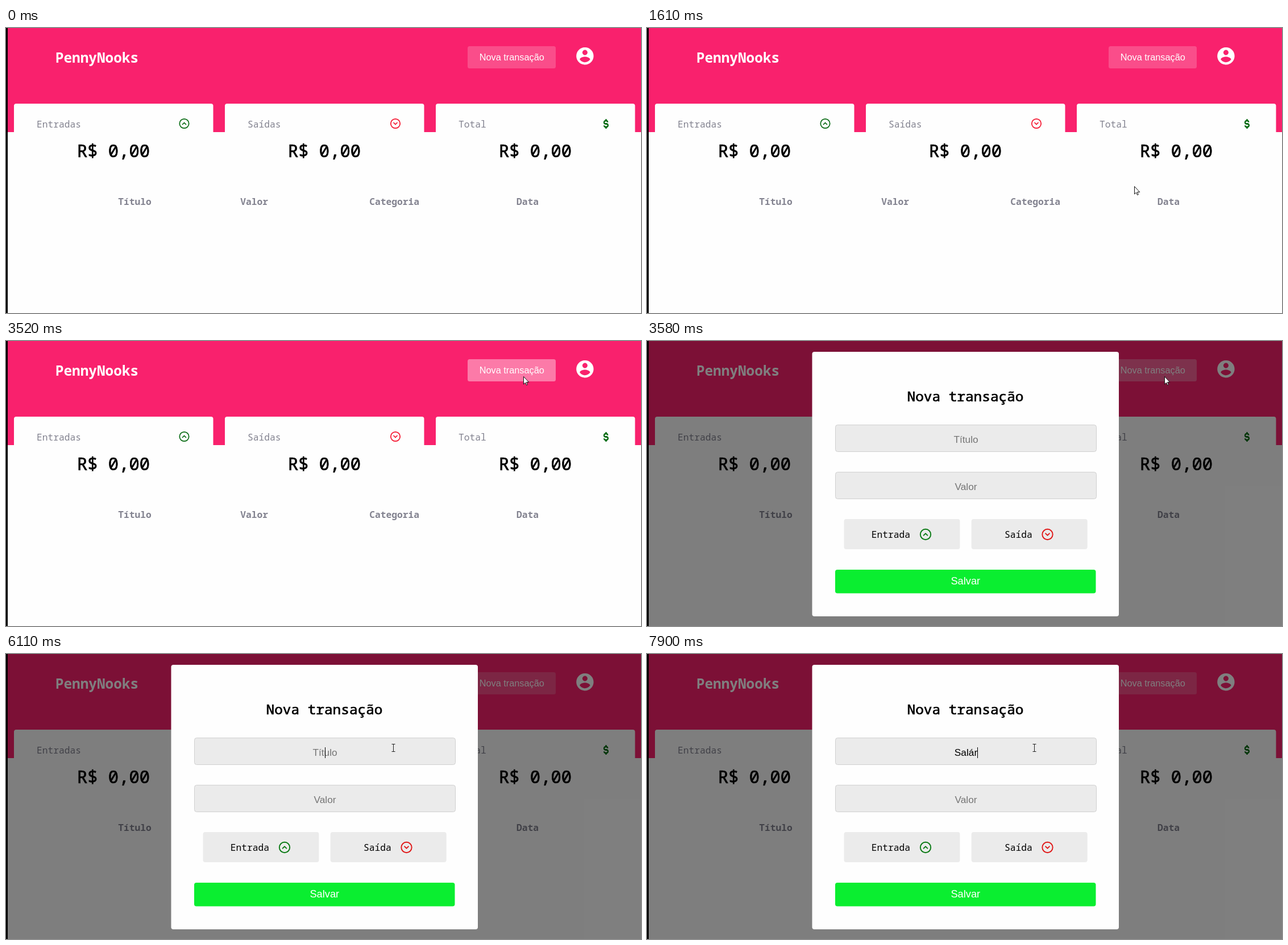
An HTML page for the animation above (8 s loop, 1117 by 501 pixels).

```html
<!DOCTYPE html>
<html lang="pt-BR">
<head>
<meta charset="utf-8">
<title>PennyNooks</title>
<style>
  html, body { margin: 0; width: 100%; height: 100%; overflow: hidden; background: #fefefe; }
  svg { display: block; width: 1117px; height: 501px; }
  text { font-family: "Noto Sans Mono", "DejaVu Sans Mono", monospace; font-size: 16.27px; white-space: pre; }
  .sans { font-family: "Liberation Sans", Arial, sans-serif; }
  .mid { text-anchor: middle; }
  .label { fill: #82828f; }
  .head { fill: #82828f; font-weight: 600; }
  .money { font-size: 30.5px; }
  .logo { font-size: 24.4px; font-weight: 700; }
  .title { font-size: 24.4px; }
  .money, .title { font-weight: 500; stroke: #000; stroke-width: .7px; }
  .field { font-size: 17.28px; }
  .save { font-size: 18.3px; fill: #fff; }
  .ring { fill: none; stroke-width: 1.7px; stroke-linecap: round; stroke-linejoin: round; }
</style>
</head>
<body>
<svg viewBox="0 0 1117 501">
  <defs>
    <g id="up" class="ring"><circle r="8.2"/><path d="M-3 1.5L0-1.5L3 1.5"/></g>
    <g id="down" class="ring"><circle r="8.2"/><path d="M-3-1.5L0 1.5L3-1.5"/></g>
  </defs>

  <rect width="1117" height="501" fill="#fefefe"/>
  <rect width="1117" height="183" fill="#f9216d"/>
  <g id="cards"></g>
  <g id="heads"></g>
  <use href="#up" x="313.5" y="168" stroke="#066a12"/>
  <use href="#down" x="685" y="168" stroke="#f5132d"/>
  <path transform="translate(1055.5 168.5) scale(1.15 1.4) translate(-12 -12)" fill="#066a12"
    d="M12 15c-1.84 0-2-.86-2-1H8c0 .92.66 2.55 3 2.92V18h2v-1.08c2-.34 3-1.63 3-2.92 0-1.12-.52-3-4-3-2 0-2-.63-2-1s.7-1 2-1 1.39.64 1.4 1h2A3 3 0 0 0 13 7.12V6h-2v1.09C9 7.42 8 8.71 8 10c0 1.12.52 3 4 3 2 0 2 .68 2 1s-.62 1-2 1z"/>
  <g fill="#fff">
    <rect id="button" x="812" y="32" width="155" height="39" rx="3.5"/>
    <text class="logo mid" x="160" y="61">PennyNooks</text>
    <text class="sans mid" x="889.8" y="57">Nova transação</text>
    <path transform="translate(1018.4 49.2) scale(1.52) translate(-12 -12)" fill-rule="evenodd"
      d="M12 2a10 10 0 1 0 0 20a10 10 0 1 0 0-20zm0 3a3 3 0 1 1 0 6a3 3 0 1 1 0-6zm0 14.2c-2.5 0-4.7-1.3-6-3.2c0-2 4-3.1 6-3.1s6 1.1 6 3.1c-1.3 1.9-3.5 3.2-6 3.2z"/>
  </g>
  <rect id="shade" width="1117" height="501" fill-opacity=".5"/>
  <rect width="3" height="501"/>

  <g id="modal">
    <rect x="290.5" y="19" width="539.5" height="465" rx="4" fill="#fefefe"/>
    <text class="title mid" x="560" y="105.5">Nova transação</text>
    <g fill="#ebebeb">
      <rect x="331.5" y="147.5" width="459" height="47" rx="4" stroke="#d0d0d0"/>
      <rect x="331.5" y="230.5" width="459" height="47" rx="4" stroke="#d0d0d0"/>
      <rect x="346.5" y="313" width="204" height="53" rx="4"/>
      <rect x="570.7" y="313" width="204" height="53" rx="4"/>
    </g>
    <text id="entry" class="sans field mid" x="561" y="178.5"></text>
    <rect id="caret" y="164" width="1" height="19"/>
    <text class="sans field mid" x="561" y="261.5" fill="#757575">Valor</text>
    <text x="394.7" y="345.5">Entrada</text>
    <text x="629" y="345.5">Saída</text>
    <use href="#up" transform="translate(490 340) scale(1.12)" stroke="#0a7a14"/>
    <use href="#down" transform="translate(704.5 340) scale(1.12)" stroke="#e01818"/>
    <rect x="331" y="402" width="458.5" height="41.5" rx="4" fill="#0aee30"/>
    <text class="sans save mid" x="560.3" y="428.3">Salvar</text>
  </g>

  <g id="cursor">
    <path id="arrow" d="M.5.5v13.5l3-2.8l2 4.4l1.9-.8l-2-4.4h4.3z" fill="#fff" stroke="#111"/>
    <path id="beam" d="M-3-6.5H3M-3 6.5H3M0-6.5V6.5" fill="none" stroke="#222"/>
  </g>
</svg>
<script>
const LOOP = 8000, OPEN = 3580, FOCUS = 5020, BLINK = 535, TICK = 69;
const $ = id => document.getElementById(id);
const show = (id, on) => $(id).setAttribute('display', on ? 'inline' : 'none');
const clamp = v => Math.min(1, Math.max(0, v));
const easeOut = k => 1 - (1 - k) ** 2;

$('cards').innerHTML = ['Entradas', 'Saídas', 'Total'].map((name, i) => `
  <g transform="translate(${371 * i} 0)">
    <rect x="14" y="133" width="350.5" height="110" rx="4" fill="#fefefe"/>
    <text class="label" x="54" y="175">${name}</text>
    <text class="money mid" x="189" y="227">R$ 0,00</text>
  </g>`).join('');

$('heads').innerHTML = [['Título', 226.6], ['Valor', 436.6], ['Categoria', 683.2], ['Data', 917.6]]
  .map(([name, x]) => `<text class="head mid" x="${x}" y="310.5">${name}</text>`).join('');

// Each leg starts where the last one ended, unless the pointer enters the stage.
const legs = [
  { from: 300, to: 1060, start: [1203, -7], via: [760, 280], end: [886, 473] },
  { from: 1460, to: 1950, start: [940, 600], via: [806, 270], end: [887, 157] },
  { from: 2150, to: 2290, end: [930, 123] },
  { from: 2490, to: 3040, end: [910, 62] },
  { from: 3660, to: 4140, end: [827, 73] },
  { from: 4210, to: 4890, via: [691, 112], end: [684, 162] },
  { from: 5020, to: 5150, end: [681.5, 164.5] }
];
legs.forEach((leg, i) => {
  leg.start ||= legs[i - 1].end;
  leg.via ||= leg.start.map((v, j) => (v + leg.end[j]) / 2);
});

function cursorAt(t) {
  if (t < 300 || (t >= 1130 && t < 1460)) return null;
  const { from, to, start, via, end } = legs.filter(leg => leg.from <= t).pop();
  const gaps = Math.round((to - from) / TICK);
  const step = Math.floor((t + 12 - from) / (to - from) * gaps);
  const u = easeOut(clamp((step + 1) / (gaps + 1)));
  return start.map((a, i) => (1 - u) ** 2 * a + 2 * u * (1 - u) * via[i] + u * u * end[i]);
}

function drawCursor(t) {
  const pos = cursorAt(t);
  show('cursor', pos);
  if (!pos) return;
  const [x, y] = pos;
  const inField = t >= OPEN && x < 790 && y >= 147;
  show('arrow', !inField);
  show('beam', inField);
  const px = inField ? Math.floor(x) + .5 : Math.round(x);
  $('cursor').setAttribute('transform', `translate(${px} ${Math.round(y)})`);
}

const word = 'Salár', strokes = [6170, 6430, 7240, 7640, 7900];

function drawEntry(t) {
  const typed = strokes.filter(s => s <= t);
  const entry = $('entry');
  entry.textContent = word.slice(0, typed.length) || 'Título';
  entry.setAttribute('fill', typed.length ? '#000' : '#757575');
  const idle = t - (typed.pop() || FOCUS);
  show('caret', t >= FOCUS && Math.floor(idle / BLINK) % 2 === 0);
  const half = t >= strokes[0] ? entry.getComputedTextLength() / 2 : 0;
  $('caret').setAttribute('x', Math.floor(561 + half));
}

function draw(t) {
  const open = t >= OPEN;
  const hover = open ? clamp(.5 - (t - OPEN) / 200) : clamp((t - 2830) / 200);
  $('button').setAttribute('fill-opacity', .2 + .2 * hover);
  show('shade', open);
  show('modal', open);
  if (open) drawEntry(t);
  drawCursor(t);
}

const begin = performance.now();
function tick() {
  draw((performance.now() - begin) % LOOP);
  requestAnimationFrame(tick);
}
tick();
</script>
</body>
</html>
```
